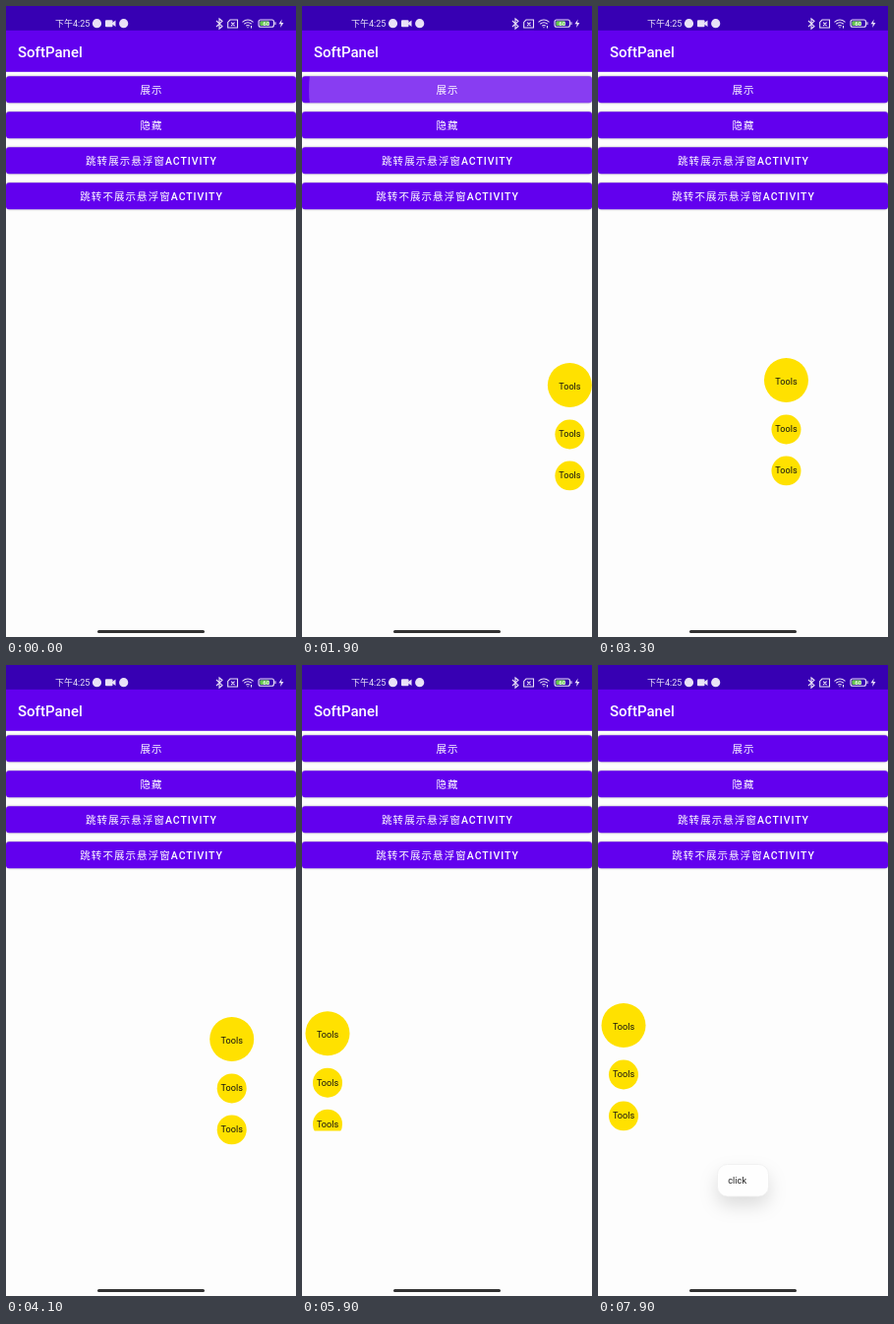
Recreate the animation shown at these times as an HTML page. Size 295 by 640 pixels, loop 8000 ms.

```html
<!DOCTYPE html>
<html lang="zh-CN">
<head>
<meta charset="utf-8">
<title>Floating tools</title>
<style>
  html, body { margin: 0; width: 100%; height: 100%; overflow: hidden; background: #fdfdfd; }
  svg { display: block; width: 100%; height: 100%; }
  text { font-family: Roboto, "Noto Sans CJK SC", "Noto Sans CJK", sans-serif; }
  .label { font-size: 10.5px; letter-spacing: 1.07px; fill: #fff; text-anchor: middle; }
  .label tspan { font-weight: 500; letter-spacing: .94px; }
  .tool { font-size: 9.1px; fill: #111; text-anchor: middle; }
  .button { fill: #6200ee; filter: drop-shadow(0 .6px .8px rgba(0, 0, 0, .3)); }
  #toast rect { filter: drop-shadow(0 9px 9px rgba(0, 0, 0, .13)); }
</style>
</head>
<body>
<svg viewBox="0 0 295 640">
  <defs>
    <clipPath id="buttonClip"><rect y="71.2" width="295" height="27" rx="3"/></clipPath>
    <clipPath id="windowClip"><rect x="-26" y="-23" width="52" height="130"/></clipPath>
  </defs>

  <rect width="295" height="640" fill="#fdfdfd"/>
  <rect y="24" width="295" height="42.8" fill="#6200ee"/>
  <rect width="295" height="24.8" fill="#3700b3"/>
  <text x="12" y="52" font-size="15" font-weight="500" fill="#fff">SoftPanel</text>

  <!-- Status bar -->
  <g fill="#e9e2f7">
    <text x="50" y="21.2" font-size="9">下午4:25</text>
    <circle cx="92.5" cy="17.7" r="4.6"/>
    <circle cx="119.7" cy="17.7" r="4.6"/>
    <rect x="101" y="14.3" width="7.5" height="7" rx="1"/>
    <path d="M108 17l3.5-2.5v6.5l-3.5-2.5z"/>
    <path d="M280.7 13.5l-3.2 4.8h2.2l-.6 3.7 3.3-5h-2.3z"/>
  </g>
  <g fill="none" stroke="#e9e2f7" stroke-width="1.1">
    <path d="M214 15l6 5.6-3 2.4v-10l3 2.4-6 5.6"/>
    <path d="M228 14h7.5v8h-9.8v-5.6zM229 16.6l3.6 3.6m0-3.6l-3.6 3.6"/>
    <path d="M240.5 16.3q5.5-4.6 11 0M242.3 18.3q3.7-3 7.4 0M244.2 20.2q1.8-1.5 3.6 0"/>
    <path d="M246 21.3v1M249.5 20v2.5"/>
    <rect x="257" y="14" width="15.5" height="7.3" rx="2"/>
    <path d="M274 16.3v2.8"/>
  </g>
  <rect x="258.3" y="15.3" width="9.5" height="4.7" rx="1" fill="#65c84d"/>
  <text x="264.7" y="20" font-size="6" font-weight="500" fill="#fff" text-anchor="middle">60</text>

  <g id="buttons"></g>
  <g clip-path="url(#buttonClip)"><circle id="ripple" cy="85" fill="#fff"/></g>
  <g id="labels"></g>

  <g id="floatWindow">
    <g clip-path="url(#windowClip)"><g id="tools"></g></g>
  </g>

  <g id="toast">
    <rect x="121.5" y="506.5" width="52" height="32.5" rx="10" fill="#fefefe" stroke="#ececec" stroke-width=".7"/>
    <text x="132.3" y="526.3" font-size="9.2" fill="#222">click</text>
  </g>
  <rect x="93" y="633" width="109" height="3" rx="1.5" fill="#333"/>
</svg>
<script>
const LOOP = 8000;
const COLLAPSE_SHIFT = 84.5;
const BUTTON_PITCH = 36.03;
const el = id => document.getElementById(id);
const lerp = (a, b, p) => a + (b - a) * p;
const progress = (t, start, end) => Math.min(1, Math.max(0, (t - start) / (end - start)));
const smooth = p => .5 - .5 * Math.cos(Math.PI * p);
const linear = p => p;

[["展示", ""], ["隐藏", ""], ["跳转展示悬浮窗", "ACTIVITY"], ["跳转不展示悬浮窗", "ACTIVITY"]]
  .forEach(([chinese, latin], i) => {
    const y = 71.2 + i * BUTTON_PITCH;
    el("buttons").innerHTML += `<rect class="button" y="${y}" width="295" height="27" rx="3"/>`;
    el("labels").innerHTML += `<text class="label" x="148" y="${Math.round(y + 17.8)}">${chinese}<tspan>${latin}</tspan></text>`;
  });

// Each tool: centre, radius, text baseline
el("tools").innerHTML = [[0, 22.5, 4.5], [50, 15, 52.8], [92, 15, 94.8]]
  .map(([y, r, baseline]) => `<circle cy="${y}" r="${r}" fill="#ffe100"/><text class="tool" y="${baseline}">Tools</text>`)
  .join("");

// Slide in, drag and snap right, then drag and snap left: time, x, y, easing
const path = [
  [1483, 321, 384.5],
  [1983, 269, 384.5, smooth],
  [2650, 269, 384.5],
  [3150, 165, 379.5, smooth],
  [3200, 165, 379.5],
  [3500, 269, 379.5, smooth],
  [3950, 269, 379.5],
  [4100, 230, 379.5, p => p * p],
  [4600, 85, 365.5, linear],
  [5050, 26, 365.5, smooth]
];

function positionAt(t) {
  const next = path.findIndex(point => point[0] > t);
  if (next < 0) return path[path.length - 1].slice(1, 3);
  const [t0, x0, y0] = path[Math.max(0, next - 1)];
  const [t1, x1, y1, ease = linear] = path[next];
  const p = ease(progress(t, t0, t1));
  return [lerp(x0, x1, p), lerp(y0, y1, p)];
}

function drawRipple(t) {
  const grow = 1 - (1 - progress(t, 1400, 1950)) ** 1.3;
  const ripple = el("ripple");
  ripple.setAttribute("cx", lerp(240, 147.5, grow));
  ripple.setAttribute("r", lerp(20, 150, grow));
  ripple.setAttribute("opacity", t < 1400 ? 0 : .24 * (1 - progress(t, 1950, 2250)));
}

function draw(t) {
  drawRipple(t);
  const [x, y] = positionAt(t);
  el("floatWindow").setAttribute("transform", `translate(${x} ${y})`);
  const collapsed = smooth(progress(t, 5800, 6300)) - smooth(progress(t, 6670, 7170));
  el("tools").setAttribute("transform", `translate(0 ${COLLAPSE_SHIFT * collapsed})`);
  el("toast").setAttribute("opacity", progress(t, 7600, 7850));
}

const start = performance.now();
function tick() {
  draw((performance.now() - start) % LOOP);
  requestAnimationFrame(tick);
}
tick();
</script>
</body>
</html>
```
